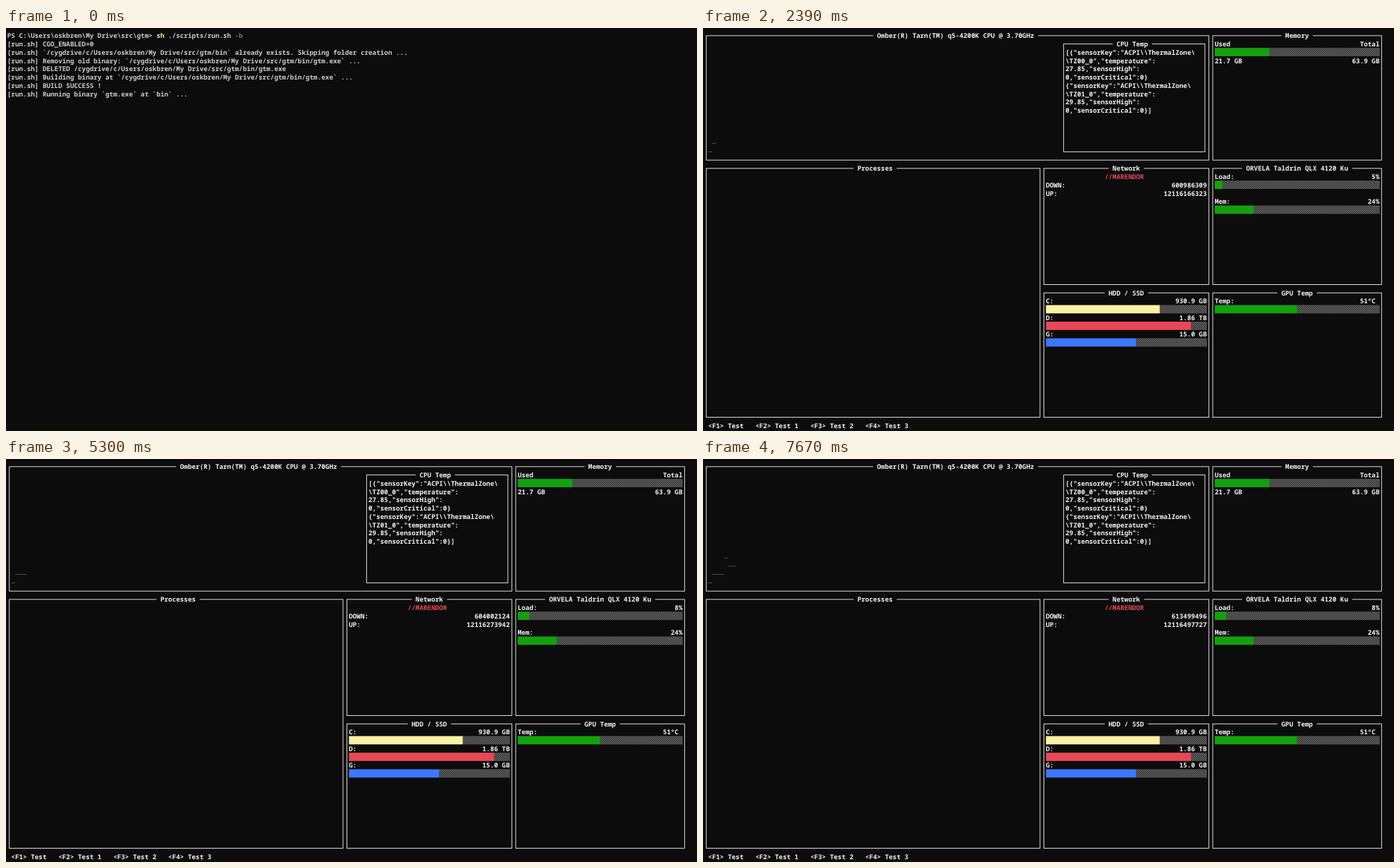
Animation of 980 by 571 pixels, one loop 8 s. Source, as an HTML page with a canvas:

```html
<!DOCTYPE html>
<html lang="en">
<head>
<meta charset="utf-8">
<title>Terminal system monitor</title>
<style>
  html, body { margin: 0; width: 100%; height: 100%; overflow: hidden; background: #0c0c0c; }
  canvas { display: block; }
</style>
</head>
<body>
<canvas id="stage" width="980" height="571"></canvas>
<script>
const ctx = document.getElementById('stage').getContext('2d');
const LOOP = 8000;
const CW = 5.568, RH = 11.755, X0 = 1.9, Y0 = 10.55;
const BG = '#0c0c0c', GRAY = '#cccccc', WHITE = '#f2f2f2', DIM = '#767676';
const GREEN = '#13a10e', PALE = '#4c8a49', YELLOW = '#f9f1a5', RED = '#e74856', BLUE = '#3b78ff';
const SHADE = '#343434', DOT = '#686868';
const USER = 'oskbren';

const colX = c => X0 + c * CW;
const midY = r => Y0 + r * RH;
const lineY = r => midY(r) + 0.3;

function text(str, col, row, color = WHITE) {
  ctx.fillStyle = color;
  [...str].forEach((ch, i) => {
    if (ch !== ' ') ctx.fillText(ch, colX(col + i) - 0.1, midY(row) + 3.7);
  });
}
const textRight = (str, end, row) => text(str, end - str.length, row);

function cells(col, row, n, fill) {
  ctx.fillStyle = fill;
  ctx.fillRect(colX(col), midY(row) - RH / 2, n * CW, RH);
}

// Staggered dots, four columns and eight rows to a cell.
function shade(col, row, n) {
  cells(col, row, n, SHADE);
  ctx.fillStyle = DOT;
  const w = CW / 4, h = RH / 8;
  for (let i = 0; i < n * 4; i++) {
    for (let j = i % 2; j < 8; j += 2) {
      ctx.fillRect(colX(col) + i * w, midY(row) - RH / 2 + j * h, w, h);
    }
  }
}

function bar(col, row, width, filled, color = GREEN) {
  shade(col + filled, row, width - filled);
  cells(col, row, filled, color);
}

function panel(c1, r1, c2, r2, title, titleCol) {
  const x = colX(c1 + 0.5), y = lineY(r1);
  ctx.strokeStyle = WHITE;
  ctx.lineWidth = 0.9;
  ctx.strokeRect(x, y, (c2 - c1) * CW, (r2 - r1) * RH);
  ctx.fillStyle = BG;
  ctx.fillRect(colX(titleCol - 1), y - 2, (title.length + 2) * CW, 4);
  text(title, titleCol, r1);
}

function dash(col, row, color) {
  ctx.fillStyle = color;
  ctx.fillRect(colX(col), lineY(row) - 0.35, CW, 0.7);
}

const binDir = '/cygdrive/c/Users/' + USER + '/My Drive/src/gtm/bin';
const log = [
  'CGO_ENABLED=0',
  '`' + binDir + '` already exists. Skipping folder creation ...',
  'Removing old binary: `' + binDir + '/gtm.exe` ...',
  'DELETED ' + binDir + '/gtm.exe',
  'Building binary at `' + binDir + '/gtm.exe` ...',
  'BUILD SUCCESS !',
  'Running binary `gtm.exe` at `bin` ...'
];

function drawShell() {
  text('PS C:\\Users\\' + USER + '\\My Drive\\src\\gtm>', 0, 0, GRAY);
  text('sh', 38, 0, YELLOW);
  text('./scripts/run.sh', 41, 0, GRAY);
  text('-b', 58, 0, DIM);
  log.forEach((s, i) => text('[run.sh] ' + s, 0, i + 1, GRAY));
}

const sensors = [
  '[{"sensorKey":"ACPI\\\\ThermalZone\\',
  '\\TZ00_0","temperature":',
  '27.85,"sensorHigh":',
  '0,"sensorCritical":0}',
  '{"sensorKey":"ACPI\\\\ThermalZone\\',
  '\\TZ01_0","temperature":',
  '29.85,"sensorHigh":',
  '0,"sensorCritical":0}]'
];

// [start ms, bytes down, bytes up]
const traffic = [
  [1330, 600986309, 12116166195],
  [1860, 600986309, 12116166323],
  [3190, 600986845, 12116166587],
  [4240, 600987513, 12116166951],
  [5300, 604002124, 12116273942],
  [6360, 613461872, 12116483165],
  [7410, 613499496, 12116497727]
];
// [start ms, percent]
const loads = [[1330, 3], [2130, 5], [3450, 7], [4510, 8], [5560, 9], [6620, 7], [7670, 8]];
// [start ms, column, row, color]
const usage = [
  [1330, 1, 14, PALE], [2390, 2, 13, PALE], [3450, 3, 13, PALE], [4510, 4, 13, PALE],
  [5560, 5, 11, GREEN], [6620, 6, 12, GREEN], [7670, 7, 12, GREEN]
];
const at = (list, t) => list.filter(e => e[0] <= t).pop();

function drawGauges(t) {
  const ready = t >= 1330;
  const width = ready ? 42 : 13, end = 130 + width;
  text('Used', 130, 1);
  textRight('Total', end, 1);
  bar(130, 2, width, Math.round(width * 0.34));
  text('21.7 GB', 130, 3);
  text('63.9 GB', ready ? 165 : 137, 3);
  text('Temp:', 130, 32);
  textRight('51ºC ', end, 32);
  bar(130, 33, width, Math.round(width * 0.51));
}

function drawStats(t) {
  sensors.forEach((s, i) => text(s, 92, i + 2));

  const [, down, up] = at(traffic, t);
  text('//MARENDOR', 102, 17, RED);
  text('DOWN:', 87, 18);
  textRight(String(down), 128, 18);
  text('UP:', 87, 19);
  textRight(String(up), 128, 19);

  const disks = [['C:', '930.9 GB', 29, YELLOW], ['D:', '1.86 TB', 37, RED], ['G:', '15.0 GB', 23, BLUE]];
  disks.forEach(([name, size, filled, color], i) => {
    text(name, 87, 32 + 2 * i);
    textRight(size, 128, 32 + 2 * i);
    bar(87, 33 + 2 * i, 41, filled, color);
  });

  const load = at(loads, t)[1];
  text('Load:', 130, 17);
  textRight(load + '%', 172, 17);
  bar(130, 18, 42, Math.round(load * 0.42));
  text('Mem:', 130, 20);
  textRight('24%', 172, 20);
  bar(130, 21, 42, 10);
}

function drawMonitor(t) {
  panel(0, 0, 128, 15, 'Omber(R) Tarn(TM) q5-4200K CPU @ 3.70GHz', 44);
  panel(91, 1, 127, 14, 'CPU Temp', 105);
  panel(129, 0, 172, 15, 'Memory', 148);
  panel(0, 16, 85, 46, 'Processes', 39);
  panel(86, 16, 128, 30, 'Network', 104);
  panel(129, 16, 172, 30, 'ORVELA Taldrin QLX 4120 Ku', 138);
  panel(86, 31, 128, 46, 'HDD / SSD', 103);
  panel(129, 31, 172, 46, 'GPU Temp', 147);
  text('<F1> Test   <F2> Test 1   <F3> Test 2   <F4> Test 3', 1, 47);

  drawGauges(t);
  if (t < 1330) {
    dash(1, 10, GREEN);
    return;
  }
  drawStats(t);
  usage.filter(u => u[0] <= t).forEach(([, col, row, color]) => dash(col, row, color));
}

function draw(t) {
  ctx.fillStyle = BG;
  ctx.fillRect(0, 0, 980, 571);
  ctx.font = '600 9.28px "Noto Sans Mono", "DejaVu Sans Mono", monospace';
  ctx.textBaseline = 'alphabetic';
  ctx.textRendering = 'geometricPrecision';
  if (t < 1060) drawShell();
  else drawMonitor(t);
}

// The picture only changes at these times, so repaint only then.
const cuts = [0, 1060, ...[...traffic, ...loads, ...usage].map(e => e[0])];
const start = performance.now();
let shown = -1;
function tick() {
  const t = (performance.now() - start) % LOOP;
  const cut = Math.max(...cuts.filter(c => c <= t));
  if (cut !== shown) draw(cut);
  shown = cut;
  requestAnimationFrame(tick);
}
tick();
</script>
</body>
</html>
```
